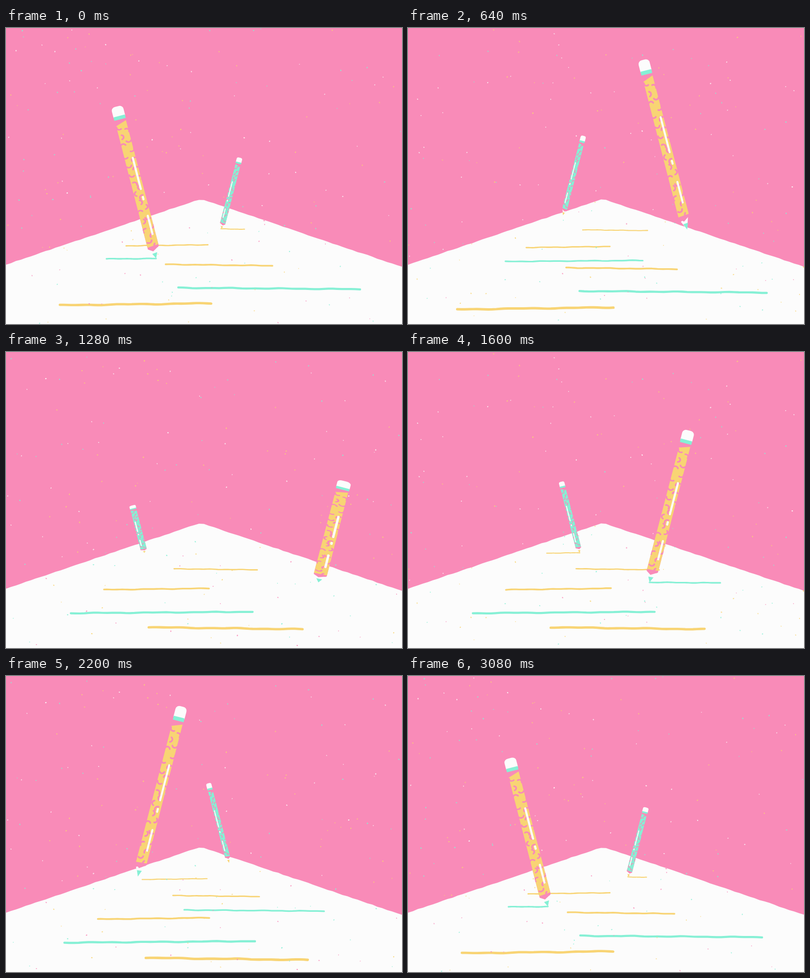
Recreate the animation shown at these times as an HTML page with a canvas. Size 800 by 600 pixels, loop 3120 ms.

```html
<!DOCTYPE html>
<html lang="en">
<head>
<meta charset="utf-8">
<title>Two pencils</title>
<style>
html, body { margin: 0; width: 100%; height: 100%; overflow: hidden; background: #f98bb8; }
canvas { display: block; }
</style>
</head>
<body>
<canvas id="stage" width="800" height="600"></canvas>
<script>
const ctx = document.getElementById('stage').getContext('2d');
const PINK = '#f98bb8', WHITE = '#fcfcfc', TEAL = '#86f0d5', YELLOW = '#f8d474';
const LOOP = 3120, STEP = 40;
const GROUND = 467, SMALL_SCALE = 0.468;

// Written lines: start and end for each side, and their depth after each scroll
const SMALL = { ends: [[0.766, -0.43], [-1.12, 0.056]], rows: [107, 140.5, 180.5, 260, 357], color: YELLOW, tilt: 0.013 };
const BIG = { ends: [[-1.18, 0.431], [1.383, -0.228]], rows: [167, 228, 307], color: TEAL, tilt: -0.008 };

const lerp = (a, b, u) => a + (b - a) * u;
const ramp = (p, from, to) => Math.max(0, Math.min(1, (p - from) / (to - from)));
const ease = (p, from, to) => {
  const u = ramp(p, from, to);
  return u * u * (3 - 2 * u);
};
const bump = (p, center, width) => 1 - ease(Math.abs(p - center), 0, width);

function random(seed) {
  return () => {
    seed = (seed + 0x6D2B79F5) | 0;
    let n = Math.imul(seed ^ seed >>> 15, 1 | seed);
    n = n + Math.imul(n ^ n >>> 7, 61 | n) ^ n;
    return ((n ^ n >>> 14) >>> 0) / 4294967296;
  };
}

// Phase 0 lies within a stroke; the first side turns over a little faster in the air
function phaseAt(t) {
  if (t >= 2880) return { side: 0, p: t - LOOP };
  if (t >= 1280) return { side: 1, p: t - 1520 };
  return { side: 0, p: t > 680 ? lerp(680, 1360, ramp(t, 680, 1280)) : t };
}

// Big pencil while it writes to the right: draw, crouch, leap, swing over, land
function poseAt(p) {
  const written = lerp(ramp(p, -236, 364), ease(p, -236, 364), 0.4);
  const crouch = bump(p, 400, 200);
  const landing = bump(p, -240, 240) + bump(p, 1360, 240);
  const leap = ease(p, 400, 640), drift = ramp(p, 640, 1360);
  const hop = ease(p, 440, 660) * (1 - ease(p, 1120, 1320));
  return {
    written,
    x: 203 + 269 * written - 9 * crouch + 92 * leap + 67 * drift,
    y: GROUND - (60 + 10 * drift) * hop,
    length: 318 + 38 * hop - 110 * crouch - 106 * landing,
    lean: 14.5 + 10.5 * crouch - 29 * ramp(p, 680, 1360)
  };
}

function shape(color, points) {
  ctx.fillStyle = color;
  ctx.beginPath();
  points.forEach(([x, y]) => ctx.lineTo(x, y));
  ctx.fill();
}

const ridge = x => 346.3 + Math.hypot(x - 393.5, 3) * 0.339;

function paper(set) {
  ctx.fillStyle = PINK;
  ctx.fillRect(0, 0, 800, 600);
  const rnd = random(set + 40), edge = [[0, 600]];
  for (let x = 0; x <= 800; x += 10) edge.push([x, ridge(x) + (rnd() - 0.5) * 1.2]);
  shape(WHITE, [...edge, [800, 600]]);
}

function specks(set) {
  const rnd = random(set * 97 + 11);
  for (let i = 0; i < 165; i++) {
    const x = rnd() * 800, y = rnd() * 600, size = 1.5 + rnd();
    const plain = y < ridge(x) ? WHITE : PINK;
    ctx.fillStyle = [plain, YELLOW, TEAL][i % 3];
    ctx.globalAlpha = 0.65 + rnd() * 0.3;
    ctx.beginPath();
    ctx.ellipse(x, y, size * 0.62, size * 0.48, rnd() * 3, 0, 7);
    ctx.fill();
  }
  ctx.globalAlpha = 1;
}

function writtenLine(kind, type, h, part, seed) {
  const [a, b] = kind.ends[type], mid = (a + b) / 2;
  const tilt = kind.tilt * (type ? -1 : 1), steps = 40;
  ctx.strokeStyle = kind.color;
  ctx.lineWidth = h * 0.0185;
  ctx.lineCap = ctx.lineJoin = 'round';
  ctx.beginPath();
  for (let i = 0; i <= steps; i++) {
    const x = lerp(a, b, part * i / steps);
    const wave = 0.002 * Math.sin(x * 13 + seed) + 0.0015 * Math.sin(x * 29 + seed * 2);
    ctx.lineTo(400 + x * h, 300 + h * (1 + (x - mid) * tilt + wave));
  }
  ctx.stroke();
}

// Older lines lie nearer; each scroll moves every line one row forward
function lines(kind, side, scroll, written, set) {
  for (let k = kind.rows.length - 2; k >= 0; k--) {
    const h = lerp(kind.rows[k], kind.rows[k + 1], scroll);
    const part = k ? 1 : written;
    if (part > 0) writtenLine(kind, (side + k) % 2, h, part, set + k * 2);
  }
}

// Unit pencil: 23 wide, 354 long, tip at the origin
function pencil(x, y, scale, flip, length, lean, body, tip, seed) {
  ctx.save();
  ctx.translate(x, y);
  ctx.scale(scale * flip, scale);
  ctx.rotate(-lean * Math.PI / 180);
  ctx.scale(1 + (354 - length) * 0.0015, length / 354);
  ctx.translate(0, -354);

  shape(WHITE, [[-8.5, 336], [8.5, 328], [0, 354]]);
  shape(tip, [[-5, 342], [5, 341], [0, 354]]);
  shape(PINK, [[-11, 29], [11, 29], [11, 328], [-2, 337], [-11, 330]]);
  shape(body, [[-10.5, 43], [10.5, 35], [11, 324], [-11, 326]]);

  ctx.save();
  ctx.beginPath();
  ctx.rect(-11.3, 30, 22.6, 300);
  ctx.clip();
  ctx.strokeStyle = PINK;
  ctx.lineWidth = 3.4;
  ctx.lineCap = 'round';
  const rnd = random(seed);
  for (let i = 0; i < 26; i++) {
    const turn = rnd() * 6.3;
    ctx.beginPath();
    ctx.arc((i % 2 ? 6 : -6) + rnd() * 4 - 2, 46 + i * 11 + rnd() * 4, 5.2, turn, turn + 2.4);
    ctx.stroke();
  }
  ctx.restore();

  // One stroke broken twice makes the highlight
  ctx.strokeStyle = WHITE;
  ctx.lineWidth = 4;
  ctx.lineCap = 'round';
  ctx.setLineDash([73, 18, 6, 38]);
  ctx.beginPath();
  ctx.moveTo(5, 121);
  ctx.lineTo(5, 299);
  ctx.stroke();

  ctx.fillStyle = WHITE;
  ctx.beginPath();
  ctx.roundRect(-11.5, 0, 23, 24, [8, 8, 0, 0]);
  ctx.fill();
  ctx.fillStyle = TEAL;
  ctx.fillRect(-11.3, 22, 22.6, 8);
  ctx.restore();
}

function draw(time) {
  const t = Math.floor(time % LOOP / STEP) * STEP;
  // Three paper textures take turns, three rounds per loop
  const set = [0, 2, 1][Math.floor((t + 280) % 1040 / 347)];
  const { side, p } = phaseAt(t);
  const { written, x, y, length, lean } = poseAt(p);
  const scroll = ease(p, 506, 1249);
  const dir = side ? -1 : 1;

  paper(set);
  lines(SMALL, side, scroll, written, set);
  lines(BIG, side, scroll, written, set);
  specks(set);

  const smallX = (side ? 280 : 482) - dir * (x - 203) * SMALL_SCALE;
  const smallY = 407 - (GROUND - y) * SMALL_SCALE;
  pencil(smallX, smallY, SMALL_SCALE, -1, length, lean * dir, TEAL, YELLOW, 5);
  pencil(side ? 834 - x : x, y, 1, 1, length, lean * dir, YELLOW, TEAL, 8);
}

const start = performance.now();
function tick() {
  draw(performance.now() - start);
  requestAnimationFrame(tick);
}
tick();
</script>
</body>
</html>
```
